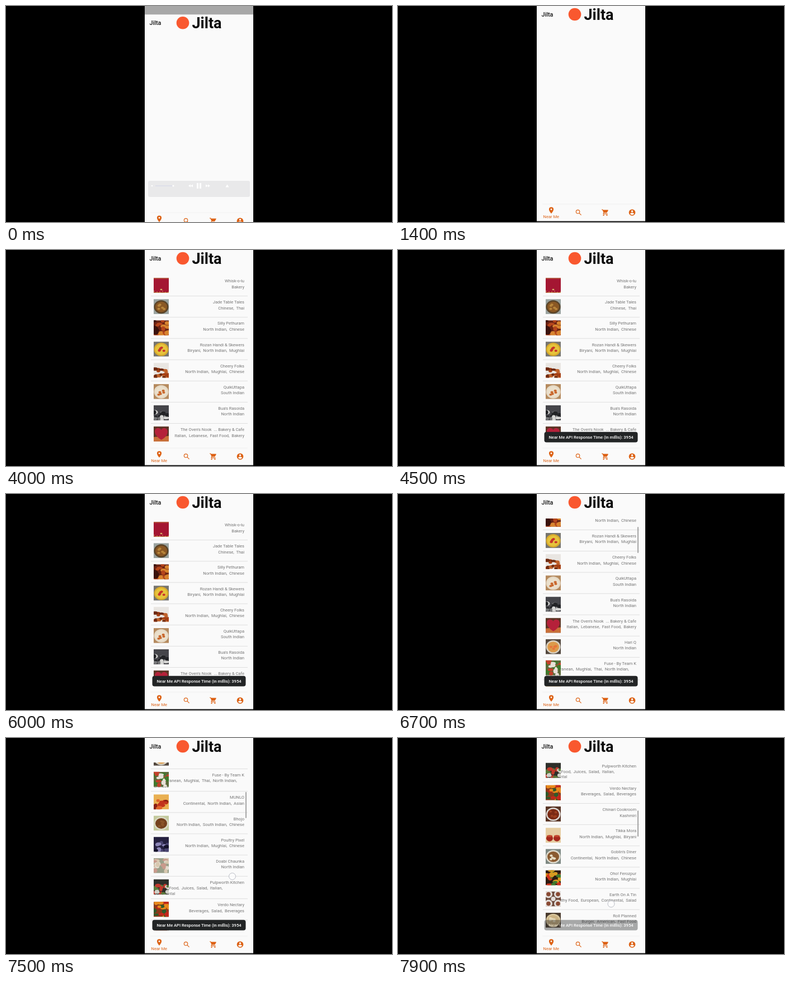
Animation, 690 px wide and 388 px high, one loop 8000 ms. Source, as an HTML page:

```html
<!DOCTYPE html>
<html lang="en">
<head>
<meta charset="utf-8">
<title>Food app</title>
<style>
  html, body { margin: 0; height: 100%; overflow: hidden; background: #000; }
  svg { display: block; }
  #stage { width: 100vw; height: 100vh; }
  text { font: 7.55px Roboto, sans-serif; fill: #757575; }
  .title { font-size: 10.78px; font-weight: 500; fill: #151515; }
  .wordmark { font-size: 27px; font-weight: 700; fill: #0b0b0b; }
  #nav text { fill: #dd6215; }
  #toast text { font-weight: 500; fill: #fff; }
  .end { text-anchor: end; }
  .mid { text-anchor: middle; }
</style>
</head>
<body>
<svg id="stage" viewBox="0 0 690 388">
  <defs>
    <clipPath id="listArea"><rect x="248" y="44" width="194" height="301.5"/></clipPath>
  </defs>
  <rect width="690" height="388"/>
  <rect x="248" width="194" height="16" fill="#a8a8a8"/>
  <g id="app">
    <rect x="248" width="194" height="386.5" fill="#fafafa"/>
    <text class="title" x="256.5" y="18.8">Jilta</text>
    <circle cx="316" cy="15" r="11.3" fill="#f9582f"/>
    <text class="wordmark" x="332.5" y="24.7">Jilta</text>
    <g id="list" clip-path="url(#listArea)">
      <g id="rows"></g>
      <rect id="thumb" x="428" width="2" height="46.5" fill="#a6a6a6"/>
    </g>
    <g id="nav" fill="#dd6215">
      <path d="M258 355.8H432" stroke="#efefef" stroke-width=".8"/>
      <g transform="translate(267 360) scale(.583)">
        <path fill-rule="evenodd" d="M12 2a7 7 0 0 0-7 7c0 5.2 7 13 7 13s7-7.8 7-13a7 7 0 0 0-7-7zm0 4.5a2.5 2.5 0 1 1 0 5 2.5 2.5 0 0 1 0-5z"/>
      </g>
      <text class="mid" x="273.8" y="381">Near Me</text>
      <g transform="translate(316 364) scale(.583)" fill="none" stroke="#dd6215" stroke-width="2">
        <circle cx="9.5" cy="9.5" r="5.5"/><path d="M13.8 13.8l6 6"/>
      </g>
      <g transform="translate(363.5 364) scale(.583)">
        <path d="M1 2h3.3l1 2H20q1.5 0 .9 1.5l-3.6 6.5q-.5 1-1.7 1H8.1L7 15h12v2H7q-2.6-.4-1.8-3l1.4-2.4L3 4H1z"/>
        <circle cx="7" cy="20" r="2"/><circle cx="17" cy="20" r="2"/>
      </g>
      <g transform="translate(411.5 364) scale(.583)">
        <circle cx="12" cy="12" r="10"/>
        <g fill="#fafafa"><circle cx="12" cy="8" r="3"/><path d="M6 16c0-4 12-4 12 0-3 4.3-9 4.3-12 0z"/></g>
      </g>
    </g>
    <g id="toast">
      <rect x="261.5" y="326.7" width="167" height="18.8" rx="4" fill="#222425"/>
      <text class="mid" x="345" y="339.2">Near Me API Response Time (in millis): 3954</text>
    </g>
    <circle id="touch" r="6" fill="#fff" fill-opacity=".65" stroke="#a9adb8" stroke-width=".8"/>
  </g>
  <g id="player" fill="#fff">
    <rect x="254" y="314" width="182" height="29" rx="3" fill="#e9e9ea"/>
    <path d="M267 323H297" stroke="#dcdde9" stroke-width="1.6"/>
    <circle cx="261" cy="323" r="1.3"/><circle cx="299" cy="323" r="1.5"/>
    <path d="M341 318h3v10h-3zM346 318h3v10h-3z"/>
    <path d="M326 323l4-2.5v5zM330 323l4-2.5v5zM365 323l-4-2.5v5zM361 323l-4-2.5v5zM392.5 325.5l3-5 3 5z"/>
  </g>
</svg>
<script>
const LOOP = 8000, STEP = 100;
const ROW = 38.15, TALL = 40.4, FIRST = 50;
const $ = id => document.getElementById(id);

function add(parent, tag, attrs, text) {
  const node = document.createElementNS("http://www.w3.org/2000/svg", tag);
  for (const key in attrs) node.setAttribute(key, attrs[key]);
  if (text) node.textContent = text;
  parent.append(node);
  return node;
}

// name | cuisines ("/" wraps the line) | picture kind | colours, background first
const restaurants = `
Whisk-o-lu|Bakery|pack|#a41632 #c08a4a #d8b26a
Jade Table Tales|Chinese, Thai|bowl|#9aa3a0 #5b4428 #8a5824 #b8863c
Silly Pethuram|North Indian, Chinese|heap|#6a2213 #b5451c #d8842f #3a120c
Rozan Handi & Skewers|Biryani, North Indian, Mughlai|bowl|#77756f #d9ab2c #e6c43c #c8352b
Cheery Folks|North Indian, Mughlai, Chinese|pile|#e9e6e2 #a63f14 #6e2a10 #c0622c
QuikUttapa|South Indian|bowl|#b58a5e #e4d8c4 #ebe0cc #c9682e
Bua's Rasoida|North Indian|pile|#45454a #222326 #d6d6d4 #77787a
The Oven's Nook\u00a0 ... Bakery & Cafe|Italian, Lebanese, Fast Food, Bakery|heart|#5d3526 #b5213a #c8703a
Hari Q|North Indian|bowl|#51463d #d8d0c0 #dc9a4a #e8743a
Fuse - By Team K|Mediterranean, Mughlai, Thai, North Indian,/Chinese|heap|#5b6b3a #3f7a2c #c2402a #e8e0d8
MUNLO|Continental, North Indian, Asian|pile|#e9b052 #c2321c #e0622a #8a1f14
Bhojo|North Indian, South Indian, Chinese|bowl|#c3c99c #d8d8c4 #75421e #8a5428
Poultry Pixel|North Indian, Mughlai, Chinese|pile|#25203f #8c86b8 #15122a #4a4470
Doabi Chaunka|North Indian|heap|#9aa08a #d8c8b0 #c99a8c #e4ddd0
Pulpworth Kitchen|Healthy Food, Juices, Salad, Italian,/Continental|pile|#2e2f2a #d0d0c8 #c23a2c #5a7a3a
Verdo Nectary|Beverages, Salad, Beverages|heap|#8a3a1a #e88a1c #c2281c #2f5a2a
Chinari Cookroom|Kashmiri|bowl|#5a3626 #dcd8d4 #7a2a14 #9c3e1e
Tikka Mora|North Indian, Mughlai, Biryani|pots|#e6cda2 #a5281c #c2452c
Goblin's Diner|Continental, North Indian, Chinese|bowl|#7d8883 #dedacd #8a5a30 #e6dcc4
Oho! Ferozpur|North Indian, Mughlai|heap|#2c1a10 #d0321c #d89a20 #3f7a2c
Earth On A Tin|Healthy Food, European, Continental, Salad|plates|#6d4a3c #e2dedb #8a4a34
Roll Planned|Burger, American, Fast Food|bowl|#4a3b2e #d8c69c #cbb283 #e4d8b8
`.trim().split("\n").map(line => line.split("|"));

function seeded(seed) {
  return () => (seed = (seed * 16807) % 2147483647) / 2147483647;
}

const disc = (pic, fill, cx, cy, rx, ry = rx) => add(pic, "ellipse", { fill, cx, cy, rx, ry });

function scatter(pic, colours, random, count, minY, size) {
  for (let i = 0; i < count; i++)
    disc(pic, colours[i % colours.length], random() * 27, minY + random() * (27 - minY),
      size * (.6 + random() * .6), size * (.4 + random() * .5));
}

const painters = {
  heap: (pic, colours, random) => scatter(pic, colours, random, 20, 0, 5),
  pile: (pic, colours, random) => scatter(pic, colours, random, 17, 11, 4.5),
  bowl(pic, [plate, food, accent], random) {
    disc(pic, plate, 13.5, 14, 13, 12);
    disc(pic, food, 13.5, 14, 10.5, 9.5);
    for (let i = 0; i < 5; i++) disc(pic, accent, 8 + random() * 11, 9 + random() * 10, 2.6, 2);
  },
  pack(pic, [rim, gold], random) {
    add(pic, "path", { d: "M0 1H27M0 26.5H27", stroke: rim, "stroke-width": 1 });
    disc(pic, gold, 13.5, 21, 2, 1.2);
    for (let x = 1; x < 27; x += 5) disc(pic, gold, x, 24 + random() * 2, .8);
  },
  heart(pic, [red, board]) {
    add(pic, "path", { d: "M0 19L27 17V27H0z", fill: board });
    add(pic, "path", { d: "M13.5 24C-4 13 2 1 9 3q3 .5 4.5 3Q16 2 20 3c8 2 7 14-6.5 21z", fill: red });
  },
  pots(pic, [dark, light]) {
    for (const x of [7, 20]) {
      disc(pic, dark, x, 19, 6, 5.5);
      disc(pic, light, x, 15, 5, 1.8);
    }
  },
  plates(pic, [plate, food]) {
    for (const x of [5, 22]) for (const y of [5, 22]) {
      disc(pic, plate, x, y, 7);
      disc(pic, food, x, y, 3.8);
    }
    disc(pic, plate, 13.5, 13.5, 4);
  }
};

let rowY = FIRST;
restaurants.forEach(([name, cuisines, kind, colours], i) => {
  const row = add($("rows"), "g", { transform: `translate(0 ${rowY})` });
  const lines = cuisines.replaceAll(", ", ",\u00a0 ").split("/");
  const wrapped = lines.length > 1;
  add(row, "text", { class: "end", x: 426, y: 8.2 }, name);
  lines.forEach((line, n) => add(row, "text",
    { class: wrapped ? "" : "end", x: wrapped ? 264 : 426, y: 18.5 + n * 9.4 }, line));

  const [ground, ...paints] = colours.split(" ");
  const pic = add(row, "svg", { x: 264, width: 27, height: 27, viewBox: "0 0 27 27" });
  add(pic, "rect", { width: 27, height: 27, fill: ground });
  painters[kind](pic, paints, seeded(7919 * (i + 1)));

  const height = wrapped ? TALL : ROW;
  add(row, "path", { d: `M259 ${height - 5.5}H432`, stroke: "#dcdcdc", "stroke-width": .9 });
  rowY += height;
});

// [time, value] pairs
const scrollKeys = [[6200, 0], [6300, 14], [6500, 72], [6700, 94.5], [6800, 108], [7000, 188],
  [7200, 250], [7400, 290], [7500, 332.5], [7700, 452], [7900, 541.9]];
const shiftKeys = [[0, 15.3], [500, 0]];
const playerKeys = [[0, 1], [700, 0]];
const toastKeys = [[4000, 0], [4500, 1], [7700, 1], [7900, .38]];
const touchSpots = { 7500: [404.5, 248.5], 7900: [381, 298] };

function at(keys, t) {
  const next = keys.findIndex(key => key[0] > t);
  if (next < 0) return keys.at(-1)[1];
  if (!next) return keys[0][1];
  const [t0, a] = keys[next - 1], [t1, b] = keys[next];
  return a + (b - a) * (t - t0) / (t1 - t0);
}

function show(id, visible) {
  $(id).style.display = visible ? "" : "none";
}

function render(t) {
  const offset = at(scrollKeys, t), spot = touchSpots[t];
  $("app").setAttribute("transform", `translate(0 ${at(shiftKeys, t)})`);
  $("player").setAttribute("opacity", at(playerKeys, t));
  $("rows").setAttribute("transform", `translate(0 ${-offset})`);
  $("thumb").setAttribute("y", 44.3 + offset * .159);
  $("toast").setAttribute("opacity", at(toastKeys, t));
  show("list", t >= 4000);
  show("thumb", offset > 0);
  show("touch", spot);
  if (spot) $("touch").setAttribute("transform", `translate(${spot})`);
}

function tick() {
  render(Math.floor(performance.now() % LOOP / STEP) * STEP);
  requestAnimationFrame(tick);
}
tick();
</script>
</body>
</html>
```
